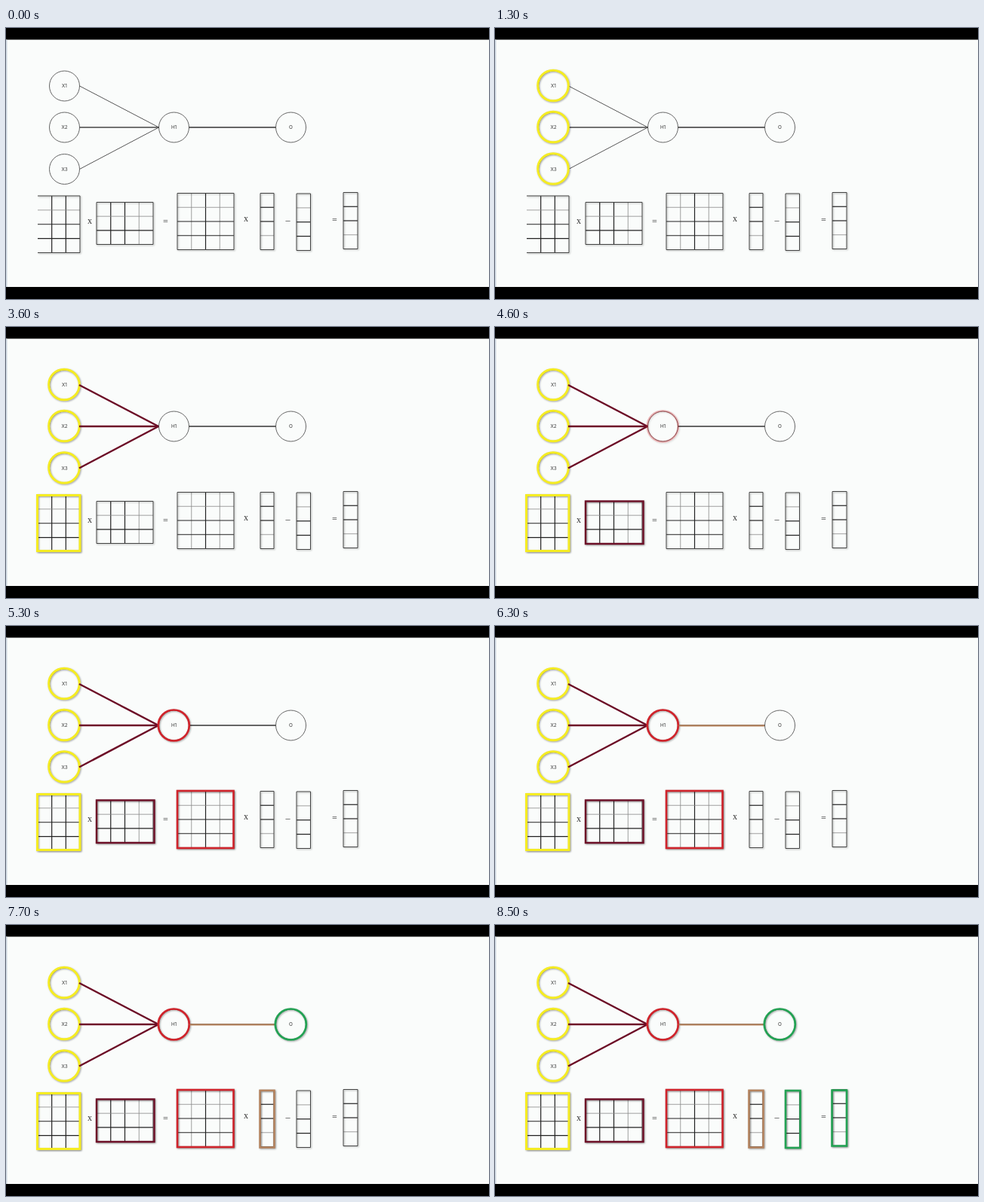
Animation of 640x360 px, one loop 8.6 s. Source, as an HTML page:

```html
<!DOCTYPE html>
<html lang="en">
<head>
<meta charset="utf-8">
<title>Forward pass</title>
<style>
  html, body { margin: 0; width: 100%; height: 100%; overflow: hidden; background: #000; }
  svg { display: block; width: 100vw; height: 100vh; }
  text { text-anchor: middle; fill: #333; }
  .label { font: 6.3px Inter, Arial, sans-serif; }
  .sign { font: 12px "Liberation Serif", serif; }
  .shadow { filter: drop-shadow(1px 1px .8px rgba(0, 0, 0, .35)); }
</style>
</head>
<body>
<svg viewBox="0 0 640 360">
  <rect width="640" height="360" fill="#000"/>
  <rect y="15.5" width="640" height="328.5" fill="#fafcfb"/>
  <rect y="15.5" width="1.5" height="328.5" fill="#cbd5df"/>
  <g id="base" fill="none"></g>
  <g id="marks" fill="none"></g>
  <g id="labels"></g>
</svg>
<script>
const LOOP = 8600, STEP = 100, FADE = 300;
const YELLOW = '#f5ec22', MAROON = '#6d0f27', RED = '#d0232b', BROWN = '#b5835e', GREEN = '#22a253';
const base = document.getElementById('base');
const marks = document.getElementById('marks');
const labels = document.getElementById('labels');

function add(parent, tag, attrs, text) {
  const el = document.createElementNS('http://www.w3.org/2000/svg', tag);
  for (const key in attrs) el.setAttribute(key, attrs[key]);
  if (text) el.textContent = text;
  parent.append(el);
  return el;
}

const line = (parent, x1, y1, x2, y2, stroke, width) =>
  add(parent, 'line', { x1, y1, x2, y2, stroke, 'stroke-width': width });
const circle = (parent, cx, cy, r, stroke, width) =>
  add(parent, 'circle', { cx, cy, r, stroke, 'stroke-width': width });
const box = (parent, x, y, right, bottom, stroke, width) =>
  add(parent, 'rect', { x, y, width: right - x, height: bottom - y, stroke, 'stroke-width': width, class: 'shadow' });

// cols and rows give the inner rules: D is dark, L is light.
function grid(x, y, right, bottom, cols, rows, openLeft) {
  const rule = (kind, ...ends) =>
    line(base, ...ends, kind === 'D' ? '#222' : '#888', kind === 'D' ? 1.2 : 0.8);
  [...cols].forEach((kind, i) => {
    const cx = x + (right - x) * (i + 1) / (cols.length + 1);
    rule(kind, cx, y, cx, bottom);
  });
  [...rows].forEach((kind, i) => {
    const cy = y + (bottom - y) * (i + 1) / (rows.length + 1);
    rule(kind, x, cy, right, cy);
  });
  const left = openLeft ? '' : `V${y}`;
  add(base, 'path', { d: `M${x} ${y}H${right}V${bottom}H${x}${left}`, stroke: '#444', 'stroke-width': 1, class: 'shadow' });
}

const inputs = [77, 132, 187.5];
const nodes = [...inputs.map((y, i) => [77.5, y, 'X' + (i + 1)]), [222.5, 132, 'H1'], [377.5, 132, 'O']];
for (const [x, y, name] of nodes) {
  circle(base, x, y, 20, '#555', 0.9);
  add(labels, 'text', { x, y: y + 2, class: 'label' }, name);
}
for (const y of inputs) line(base, 97.5, y, 202.5, 132, '#444', y === 132 ? 1.3 : 0.9);
line(base, 242.5, 132, 357.5, 132, '#333', 1.3);

grid(42, 223, 98, 298.5, 'DD', 'LDD', true);
grid(120, 231.5, 195, 287.5, 'DDL', 'LD');
grid(227, 219.5, 302, 294.5, 'LDL', 'LDD');
grid(337, 219.5, 355, 294.5, '', 'DDL');
grid(385, 220, 403.5, 295.5, '', 'LDD');
grid(447, 218.5, 466, 293.5, '', 'DDL');

for (const [x, y, sign] of [[111, 260, 'x'], [211.5, 261, '='], [318, 257, 'x'], [373.5, 259, '–'], [435.5, 258.5, '=']])
  add(labels, 'text', { x, y, class: 'sign' }, sign);

const stages = [];
function stage(start, draw) {
  const group = add(marks, 'g', { opacity: 0 });
  draw(group);
  stages.push({ start, group });
}

stage(500, g => inputs.forEach(y => circle(g, 77, y - 0.5, 20.3, YELLOW, 3).classList.add('shadow')));
stage(1500, g => box(g, 41.5, 223.5, 98, 297.5, YELLOW, 3));
stage(2600, g => inputs.forEach(y => line(g, 97, y, 202, 132, MAROON, 2.5)));
stage(3700, g => box(g, 120, 231.5, 196.5, 288, MAROON, 2.4));
stage(4600, g => circle(g, 222.3, 132, 20.5, RED, 2.7).classList.add('shadow'));
stage(5000, g => box(g, 227, 219, 301.5, 295, RED, 2.6));
stage(5900, g => line(g, 243.5, 132.3, 357, 132.3, BROWN, 2.3));
stage(6400, g => box(g, 336.5, 219.8, 355.5, 295.5, BROWN, 2.5));
stage(7300, g => circle(g, 377.3, 132, 20.5, GREEN, 2.7).classList.add('shadow'));
stage(8000, g => {
  box(g, 385, 220, 404.5, 296, GREEN, 2.6);
  box(g, 446.5, 219.5, 466, 293.5, GREEN, 2.6);
});

function render(now) {
  const time = Math.floor(now % LOOP / STEP) * STEP;
  for (const { start, group } of stages)
    group.setAttribute('opacity', Math.max(0, Math.min(1, (time - start + STEP) / FADE)));
}

const origin = performance.now();
function tick() {
  render(performance.now() - origin);
  requestAnimationFrame(tick);
}
tick();
</script>
</body>
</html>
```
